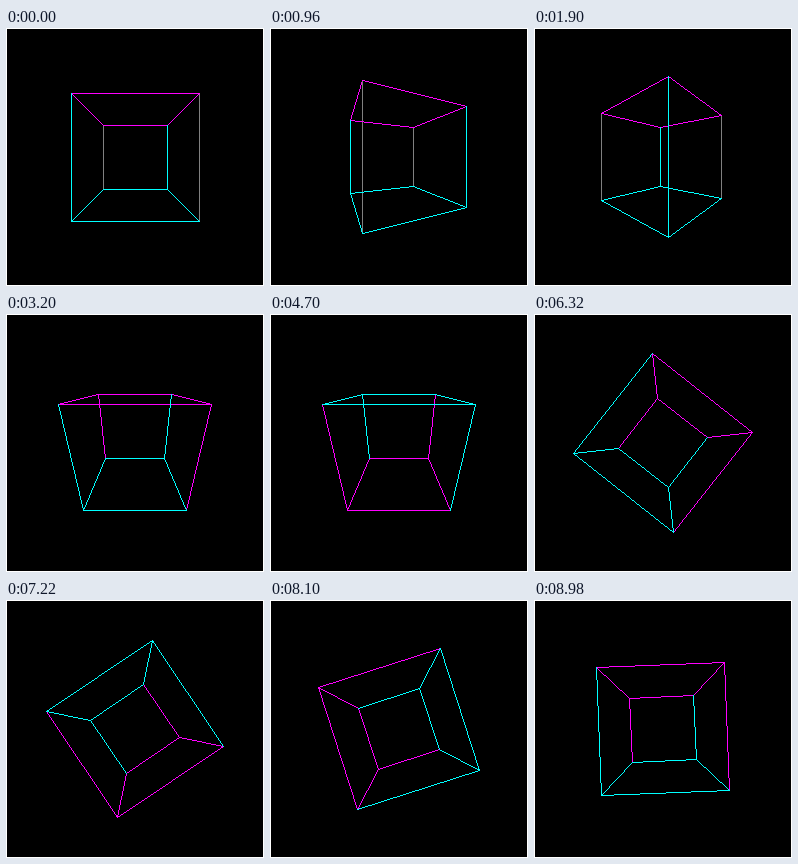
Animation, 258 px wide and 258 px high, one loop 9 s. Source, as an HTML page with a canvas:

```html
<!DOCTYPE html>
<html lang="en">
<head>
<meta charset="utf-8">
<title>Rotating cube</title>
<style>
html, body { margin: 0; width: 100%; height: 100%; overflow: hidden; background: #000; }
canvas { display: block; width: 258px; height: 258px; image-rendering: pixelated; }
</style>
</head>
<body>
<canvas id="stage" width="258" height="258"></canvas>
<script>
const ctx = document.getElementById('stage').getContext('2d');
const SIZE = 258, CENTER = 129, FOCUS = 128, DISTANCE = 3;
const STEP = 20, TURN = 150;
const MAGENTA = '#f0f', CYAN = '#0ff', GRAY = '#808080';

// Front corners 0-3 clockwise from top left, back corners 4-7 likewise.
const corners = [-1, 1].flatMap(z => [[-1, -1, z], [1, -1, z], [1, 1, z], [-1, 1, z]]);
const magentaEdges = [[0, 1], [1, 2], [4, 5], [4, 7], [0, 4], [1, 5]];
const cyanEdges = [[2, 3], [3, 0], [5, 6], [6, 7], [2, 6], [3, 7]];
const isPost = (a, b) => (a === 1 && b === 2) || (a === 4 && b === 7);

// One full turn about each axis: y, then x, then z.
const turns = [
  ([x, y, z], c, s) => [x * c - z * s, y, z * c + x * s],
  ([x, y, z], c, s) => [x, y * c - z * s, z * c + y * s],
  ([x, y, z], c, s) => [x * c - y * s, y * c + x * s, z]
];

function project([x, y, z]) {
  const k = FOCUS / (DISTANCE + z);
  return [x, y].map(v => Math.floor(CENTER + v * k + 1e-6));
}

// Hard-edged line, one pixel wide.
function line([x, y], [x1, y1], color) {
  ctx.fillStyle = color;
  const dx = Math.abs(x1 - x), dy = -Math.abs(y1 - y);
  const sx = Math.sign(x1 - x), sy = Math.sign(y1 - y);
  let err = dx + dy;
  for (;;) {
    ctx.fillRect(x, y, 1, 1);
    if (x === x1 && y === y1) return;
    const e = 2 * err;
    if (e >= dy) { err += dy; x += sx; }
    if (e <= dx) { err += dx; y += sy; }
  }
}

function draw(time) {
  const step = Math.floor(time / STEP) % (TURN * turns.length);
  const angle = (step % TURN) / TURN * 2 * Math.PI;
  const turn = turns[Math.floor(step / TURN)];
  const c = Math.cos(angle), s = Math.sin(angle);
  const pts = corners.map(p => project(turn(p, c, s)));

  ctx.fillStyle = '#fff';
  ctx.fillRect(0, 0, SIZE, SIZE);
  ctx.fillStyle = '#000';
  ctx.fillRect(1, 1, SIZE - 2, SIZE - 2);

  for (const [a, b] of magentaEdges) {
    const upright = isPost(a, b) && pts[a][0] === pts[b][0];
    line(pts[a], pts[b], upright ? GRAY : MAGENTA);
  }
  for (const [a, b] of cyanEdges) line(pts[a], pts[b], CYAN);
}

const start = performance.now();
function tick() {
  draw(performance.now() - start);
  requestAnimationFrame(tick);
}
tick();
</script>
</body>
</html>
```
